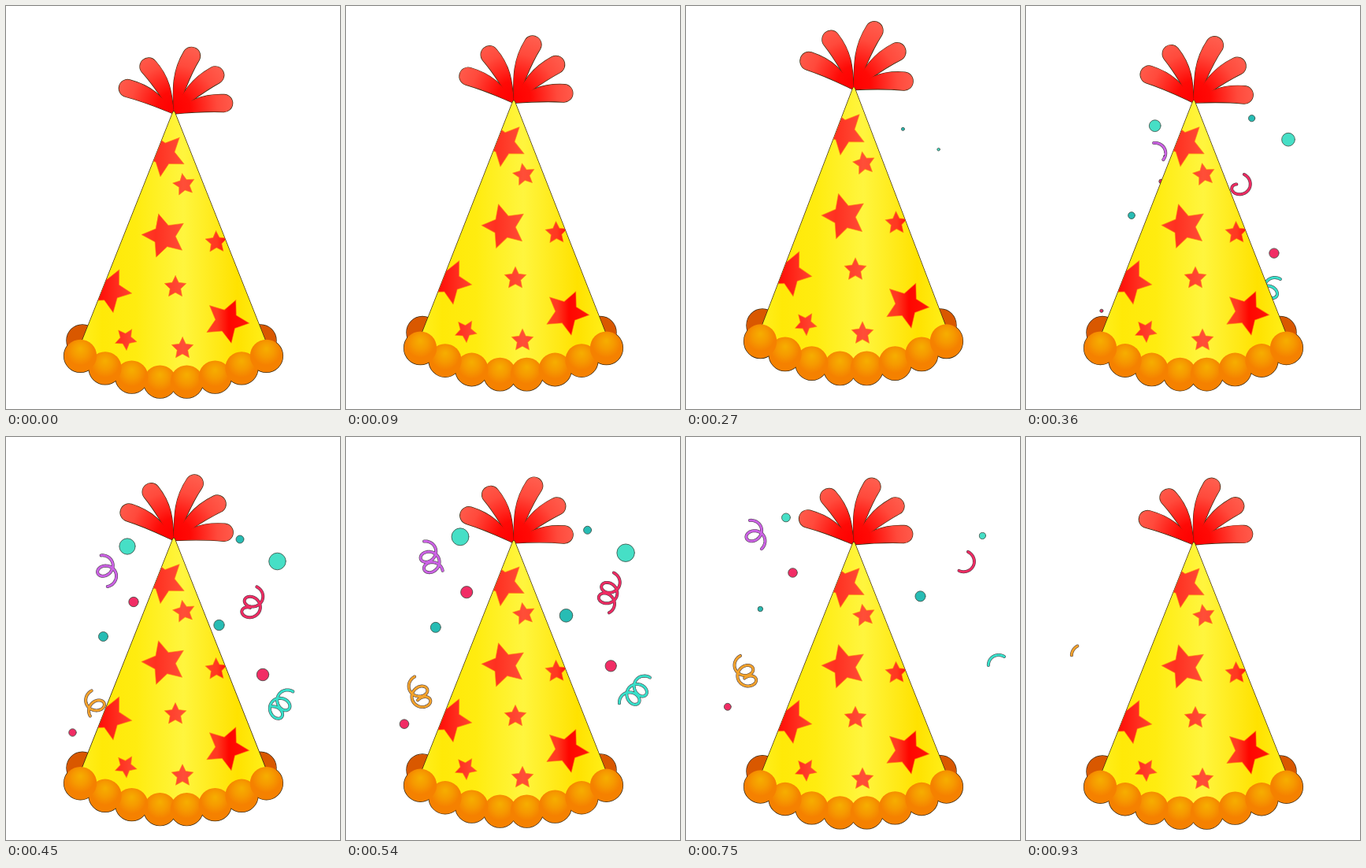
An HTML page with a canvas that plays this animation: 424x512 px, repeating every 960 ms.

```html
<!DOCTYPE html>
<html lang="en">
<head>
<meta charset="utf-8">
<title>Party hat</title>
<style>
html, body { margin: 0; width: 100%; height: 100%; overflow: hidden; background: #fff; }
canvas { display: block; width: 424px; height: 512px; }
</style>
</head>
<body>
<canvas id="stage" width="424" height="512"></canvas>
<script>
const ctx = document.getElementById('stage').getContext('2d');
const LOOP = 960, STEP = 30, RAD = Math.PI / 180, TAU = Math.PI * 2;
const AXIS = 212.5, BASE = 499, TIP = { x: 213, y: 137 };
const LINE = '#3b2a10';
const MINT = '#46dfc6', TEAL = '#27bcb4', PINK = '#f12d65';

const clamp01 = v => Math.min(1, Math.max(0, v));
// Swells from 0 to 1 and back during a life
const swell = (t, born, life) => Math.sin(Math.PI * clamp01((t - born) / life));

// ---- Hat ----

// Quick jump, then a soft settling; the hat is stretched while it is high
const PEAK = 18.8, PEAK_TIME = 210;
function hop(t) {
  const height = t < PEAK_TIME
    ? Math.sin(Math.PI / 2 * t / PEAK_TIME) ** 1.5
    : 1 / Math.cosh((t - PEAK_TIME) / 113);
  return { lift: PEAK * height, stretch: 1 + .051 * height ** 2, sway: .053 * swell(t, 0, 775) };
}

function gradient(g, ...stops) {
  for (const [at, color] of stops) g.addColorStop(at, color);
  return g;
}
function across(x0, x1, ...stops) {
  return gradient(ctx.createLinearGradient(x0, 0, x1, 0),
    ...stops.map(([x, c]) => [(x - x0) / (x1 - x0), c]));
}
function circle(x, y, r) {
  const path = new Path2D();
  path.arc(x, y, r, 0, TAU);
  return path;
}
function starPath(x, y, r, turn) {
  const path = new Path2D();
  for (let i = 0; i < 10; i++) {
    const a = (turn + i * 36) * RAD, d = i % 2 ? r * .49 : r;
    path.lineTo(x + d * Math.cos(a), y + d * Math.sin(a));
  }
  path.closePath();
  return path;
}
// A drop that leaves the tip at one angle and bends outwards to its round end
function petalPath(angle, length, r = 11) {
  const start = angle * RAD, end = (angle + 14 * Math.sign(angle + 90)) * RAD;
  const vx = Math.cos(start), vy = Math.sin(start), ex = Math.cos(end), ey = Math.sin(end);
  const x = TIP.x + vx * length, y = TIP.y + vy * length;
  const near = s => [TIP.x + vx * length * .3 - vy * r * .75 * s, TIP.y - 6 + vy * length * .3 + vx * r * .75 * s];
  const side = (s, back) => [x - ey * r * s - ex * back, y + ex * r * s - ey * back];
  const path = new Path2D();
  path.moveTo(TIP.x, TIP.y);
  path.bezierCurveTo(...near(-1), ...side(-1, length * .4), ...side(-1, 0));
  path.arc(x, y, r, end - Math.PI / 2, end + Math.PI / 2);
  path.bezierCurveTo(...side(1, length * .4), ...near(1), TIP.x, TIP.y);
  path.closePath();
  return path;
}

const petals = [[-151, 67], [-118, 68], [-73, 77], [-43, 72], [-12, 65]].map(p => petalPath(...p));
const stars = [
  ...[[200, 188, -46], [201, 292, -105], [131, 361, -64], [280, 400, -66]].map(([x, y, a]) => starPath(x, y, 29, a)),
  ...[[226, 227, -100], [267, 300, -92], [215, 357, -90], [152, 423, -58], [224, 435, -90]].map(([x, y, a]) => starPath(x, y, 14.5, a))
];
const cone = new Path2D('M211.5 136Q213 132 214.5 136L332 432Q300 478 213 478Q126 478 94 432Z');

// The trim runs along a parabola; outer balls come last and lie on top
const balls = [];
for (let i = 0; i < 4; i++) {
  const dx = 17 + 37 * i - 1.1 * i * i, y = 478 - 33.5 * (dx / 118) ** 2;
  for (const x of [AXIS - dx, AXIS + dx]) {
    const fill = gradient(ctx.createRadialGradient(x, y - 9, 1, x, y - 6, 18),
      [0, '#f6ac00'], [.5, '#f69a00'], [1, '#f58100']);
    balls.push({ path: circle(x, y, 20.8), fill });
  }
}
const backBalls = [97, 323].map(x => circle(x, 425, 20));

const plumeFill = gradient(ctx.createRadialGradient(213, 130, 0, 213, 130, 85),
  [0, '#ff0000'], [.25, '#ff0a06'], [.65, '#ff4a3c'], [1, '#ff6252']);
const coneFill = across(94, 333, [94, '#fff020'], [122, '#ffe908'], [165, '#ffec10'],
  [225, '#fff53e'], [294, '#ffe200'], [333, '#fff01c']);
const starFill = across(115, 310, [115, '#ff0a05'], [160, '#ff4530'], [190, '#ff3020'],
  [225, '#ff4e38'], [268, '#ff3820'], [283, '#ff0600'], [310, '#ff1408']);

function outline(paths) {
  ctx.strokeStyle = LINE;
  ctx.lineWidth = 1.4;
  for (const p of paths) ctx.stroke(p);
}
function fillAll(paths, fill) {
  ctx.fillStyle = fill;
  for (const p of paths) ctx.fill(p);
}

function drawHat(t) {
  const { lift, stretch, sway } = hop(t);
  ctx.save();
  ctx.translate(0, BASE - lift);
  ctx.scale(1, stretch);
  ctx.translate(0, -BASE);

  ctx.save();
  ctx.translate(TIP.x, TIP.y);
  ctx.rotate(sway);
  ctx.translate(-TIP.x, -TIP.y);
  outline(petals);
  fillAll(petals, plumeFill);
  ctx.restore();

  // The cone covers the inner outlines of the trim
  outline([...backBalls, ...balls.map(b => b.path)]);
  fillAll(backBalls, '#d95800');
  outline([cone]);
  fillAll([cone], coneFill);

  ctx.save();
  ctx.clip(cone);
  fillAll(stars, starFill);
  ctx.strokeStyle = 'rgba(255,130,10,.6)';
  ctx.lineWidth = 1;
  for (const s of stars) ctx.stroke(s);
  ctx.restore();

  for (const b of balls) fillAll([b.path], b.fill);
  ctx.restore();
}

// ---- Confetti ----

// Places at mid flight
const DOTS = [
  { x: 154, y: 139, r: 11, born: 285, color: MINT },
  { x: 162, y: 209.5, r: 7.8, born: 340, color: PINK },
  { x: 123.5, y: 253.5, r: 6.5, born: 285, color: TEAL },
  { x: 84.5, y: 375.5, r: 6, born: 340, color: PINK },
  { x: 297, y: 130, r: 5.1, born: 245, color: TEAL },
  { x: 344.5, y: 158, r: 11.3, born: 266, color: MINT },
  { x: 270.5, y: 239, r: 8.6, born: 345, color: TEAL },
  { x: 326, y: 302, r: 7.8, born: 275, color: PINK, life: 390 }
];
const MID_FLIGHT = 450;

function drawDots(t) {
  const s = (t - MID_FLIGHT) / 180, travel = 29 * (1.087 * s - .087 * s * s);
  for (const { x, y, r, born, color, life = 505 } of DOTS) {
    const size = r * Math.sqrt(swell(t, born, life));
    if (size < .4) continue;
    // Pieces farther from the axis fly flatter
    const angle = (60 - .11 * Math.abs(x - AXIS)) * RAD;
    const dot = circle(x + Math.sign(x - AXIS) * travel * Math.cos(angle), y - travel * Math.sin(angle), size);
    ctx.fillStyle = color;
    ctx.fill(dot);
    ctx.strokeStyle = '#3c4a40';
    ctx.lineWidth = .8;
    ctx.stroke(dot);
  }
}

// Places of the head when the curl is longest; spin is the side of the first bend
const CURLS = [
  { x: 88, y: 119, spin: 1, tilt: 18, born: 330, life: 530, color: '#cb62e4' },
  { x: 76, y: 291, spin: -1, tilt: 16, born: 340, life: 606, color: '#f2a22c' },
  { x: 351, y: 159, spin: 1, tilt: 14, born: 300, life: 488, color: '#ee2b62' },
  { x: 397, y: 292, spin: -1, tilt: 42, born: 280, life: 495, color: '#38e0ca' }
];
const LONGEST = 630, BEND = 11, DEPTH = 9.5, PITCH = 14;

function drawCurls(t) {
  const after = t - LONGEST;
  const out = 12 * (1 - Math.exp(-.0073 * after)), up = 42 * (1 - Math.exp(-.0031 * after));
  ctx.lineCap = ctx.lineJoin = 'round';
  for (const { x, y, spin, tilt, born, life, color } of CURLS) {
    const turns = 2.4 * swell(t, born, life);
    if (turns < .02) continue;
    const side = Math.sign(x - AXIS), sin = side * Math.sin(tilt * RAD), cos = Math.cos(tilt * RAD);
    const path = new Path2D();
    for (let i = 0; i <= 100; i++) {
      const turn = turns * i / 100, a = turn * TAU;
      const along = PITCH * turn + DEPTH * (1 - Math.cos(a)), bend = spin * BEND * Math.sin(a);
      path.lineTo(x + side * out - along * sin + bend * cos, y - up + along * cos + bend * sin);
    }
    ctx.strokeStyle = '#4a4048';
    ctx.lineWidth = 4;
    ctx.stroke(path);
    ctx.strokeStyle = color;
    ctx.lineWidth = 2.9;
    ctx.stroke(path);
  }
}

function draw(now) {
  const t = Math.floor((now % LOOP) / STEP) * STEP;
  ctx.fillStyle = '#fff';
  ctx.fillRect(0, 0, 424, 512);
  drawDots(t);
  drawCurls(t);
  drawHat(t);
}

let start;
function tick(now) {
  start ??= now;
  draw(Math.max(0, now - start));
  requestAnimationFrame(tick);
}
draw(0);
requestAnimationFrame(tick);
</script>
</body>
</html>
```
